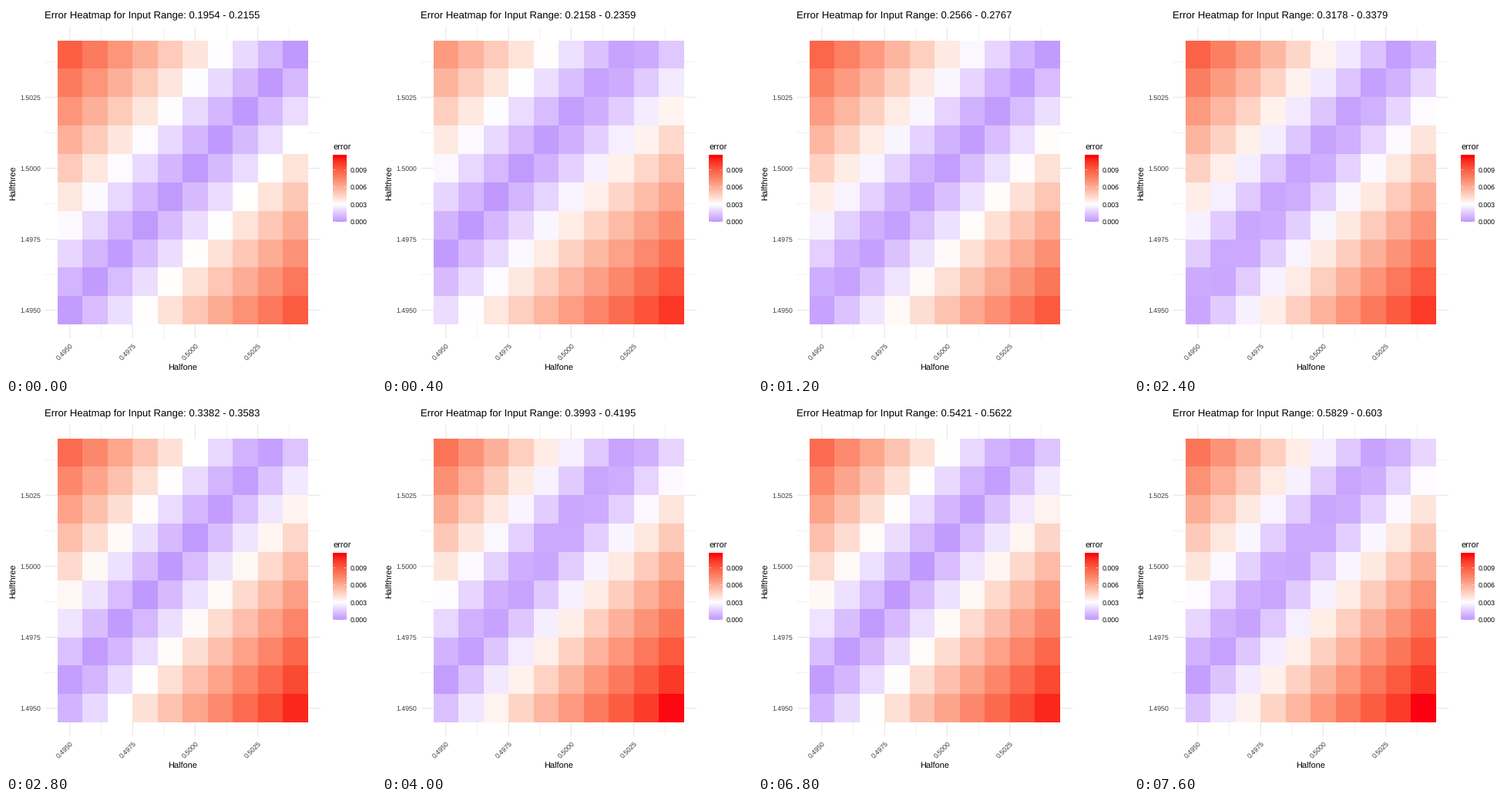
Write a matplotlib script that moves like this. It is 480x480 px and loops after 8 s.

```python
import numpy as np
import matplotlib.pyplot as plt
from matplotlib.animation import FuncAnimation

SIZE, DPI = 480, 72
FRAMES, INTERVAL = 20, 400
MIDPOINT, MAX_ERROR = 0.0030, 0.0115
LEFT, RIGHT, TOP, BOTTOM = 50.4, 408.0, 26.6, 431.4
TILE_X, TILE_W = 66.7, 32.5
TILE_BOTTOM, TILE_H = 413.2, 36.86
BAR_X, BAR_W, BAR_TOP, BAR_BOTTOM = 424.2, 17.28, 193.5, 279.9

plt.rcParams["font.family"] = "Liberation Sans"
plt.rcParams["text.hinting"] = "none"

WHITE = np.array([100.0, 0.0, 0.0])
RED = np.array([53.24, 80.09, 67.20])
BLUE = np.array([32.30, 79.19, -107.86])
XYZ_TO_RGB = np.array([[3.2405, -1.5371, -0.4985],
                       [-0.9693, 1.8760, 0.0416],
                       [0.0556, -0.2040, 1.0572]])
# Linear sRGB to the wider-blue "generic RGB" space with gamma 1.8
TO_DEVICE = np.linalg.inv([[1.029, -0.030, 0.001],
                           [0.0194, 0.9475, 0.0331],
                           [-0.0016, -0.010, 1.0116]])


def device_rgb(linear):
    return np.clip(np.clip(linear, 0, 1) @ TO_DEVICE.T, 0, 1) ** (1 / 1.8)


def device_gray(value):
    linear = ((value + 0.055) / 1.055) ** 2.4
    return str(linear ** (1 / 1.8))


def lab_to_linear(lab):
    fy = (lab[..., 0] + 16) / 116
    f = np.stack([fy + lab[..., 1] / 500, fy, fy - lab[..., 2] / 200], axis=-1)
    xyz = np.where(f > 6 / 29, f ** 3, (f - 16 / 116) / 7.787)
    return (xyz * [0.95047, 1.0, 1.08883]) @ XYZ_TO_RGB.T


def error_colors(error):
    """Diverging blue-white-red scale, interpolated in Lab space."""
    t = np.clip((error - MIDPOINT) / (MAX_ERROR - MIDPOINT), -1, 1)[..., None]
    end = np.where(t > 0, RED, BLUE)
    return device_rgb(lab_to_linear(WHITE + np.abs(t) * (end - WHITE)))


HALF_ONE, HALF_THREE = np.meshgrid(0.495 + 0.001 * np.arange(10),
                                   1.495 + 0.001 * np.arange(10))


def heatmap(x):
    """Relative error of the fast inverse square root after one Newton step."""
    bits = int(np.array([x], dtype=np.float32).view(np.int32)[0])
    guess = np.array([0x5F3759DF - (bits >> 1)], dtype=np.int32)
    y = float(guess.view(np.float32)[0])
    refined = y * (HALF_THREE - HALF_ONE * x * y * y)
    return error_colors(np.abs(refined * np.sqrt(x) - 1))


def bin_range(i):
    """Smallest and largest sampled input of bin i."""
    return 0.195448 + 0.02039 * i, 0.19514 + 0.020394 * (i + 1)


def title_text(i):
    start, end = bin_range(i)
    return f"Error Heatmap for Input Range: {start:.4f} - {end:.4g}"


def px_x(value):
    return TILE_X + (value - 0.4945) / 0.001 * TILE_W


def px_y(value):
    return TILE_BOTTOM - (value - 1.4945) / 0.001 * TILE_H


fig = plt.figure(figsize=(SIZE / DPI, SIZE / DPI), dpi=DPI, facecolor="white")
ax = fig.add_axes([0, 0, 1, 1])
ax.axis("off")

GRID = device_gray(0.92)
TICK = device_gray(0.30)


def label(x, y, text, size=8.8, color="black", **kwargs):
    return ax.text(x, y, text, fontsize=size, color=color, va="baseline",
                   rotation_mode="anchor", **kwargs)


def line(xs, ys, width, color=GRID, zorder=1):
    ax.plot(xs, ys, color=color, lw=width, solid_capstyle="butt",
            snap=False, zorder=zorder)


for k in range(4):
    offset = 0.0025 * k
    for shift, width in ((0.00125, 0.53), (0, 1.07)):
        gx, gy = px_x(0.495 + offset + shift), px_y(1.495 + offset + shift)
        line([gx, gx], [TOP, BOTTOM], width)
        line([LEFT, RIGHT], [gy, gy], width)
    label(px_x(0.495 + offset) + 5, 441.2, f"{0.495 + offset:.4f}",
          color=TICK, ha="right", rotation=45)
    label(45.6, px_y(1.495 + offset) + 3.2, f"{1.495 + offset:.4f}",
          color=TICK, ha="right")

label(229.2, 472.7, "Halfone", 11, ha="center")
label(13.4, 229.5, "Halfthree", 11, ha="center", rotation=90)
title = label(50.2, 16, title_text(0), 13.17)

# Legend
label(BAR_X, 187, "error", 11)
ramp = error_colors(np.linspace(MAX_ERROR, 0, 300))[:, None, :]
ax.imshow(ramp, extent=(BAR_X, BAR_X + BAR_W, BAR_BOTTOM, BAR_TOP),
          aspect="auto", interpolation="bilinear", zorder=2)
for k in range(4):
    tick = 0.003 * k
    y = BAR_BOTTOM - (BAR_BOTTOM - BAR_TOP) * tick / MAX_ERROR
    label(447, y + 3.3, f"{tick:.3f}")
    for x in (BAR_X, BAR_X + 0.8 * BAR_W):
        line([x, x + 0.2 * BAR_W], [y, y], 0.4, "white", 3)

edges_x = np.round(TILE_X + TILE_W * np.arange(11))
edges_y = np.round(TILE_BOTTOM - TILE_H * np.arange(11))
tiles = ax.pcolormesh(edges_x, edges_y, heatmap(bin_range(0)[1]), zorder=2)

ax.set_xlim(0, SIZE)
ax.set_ylim(SIZE, 0)


def update(i):
    title.set_text(title_text(i))
    # Samples are drawn over each other, so the last of the bin shows.
    tiles.set_array(heatmap(bin_range(i)[1]))
    return title, tiles


anim = FuncAnimation(fig, update, frames=FRAMES, interval=INTERVAL,
                     repeat=True, repeat_delay=0)
plt.show()
```
